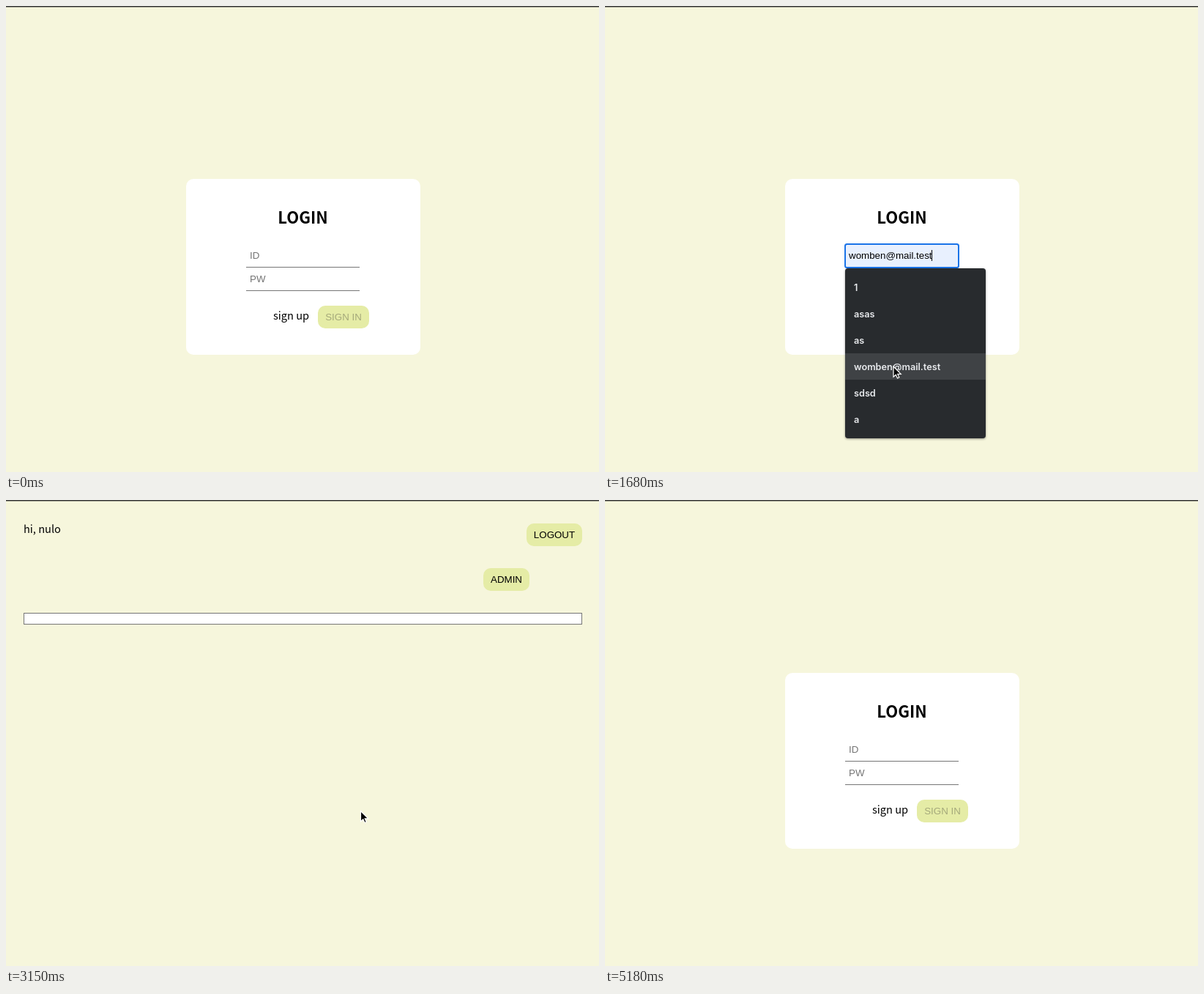
Recreate the animation shown at these times as an HTML page. Size 810 by 636 pixels, loop 5.39 s.

```html
<!DOCTYPE html>
<html lang="en">
<head>
<meta charset="utf-8">
<title>Login demo</title>
<style>
  html, body { margin: 0; width: 100%; height: 100%; overflow: hidden; background: #f6f6dc; }
  svg { display: block; width: 810px; height: 636px; }
  text { font: 13.33px "Liberation Sans", Arial, sans-serif; }
  .page { font: 14.6px "Noto Sans CJK KR", "Noto Sans CJK JP", "Noto Sans CJK SC", sans-serif; }
  .title { font-size: 22px; font-weight: 700; }
  .mid { text-anchor: middle; }
  .button { fill: #e5eca6; }
  .line { stroke: #767676; }
  #popup { filter: drop-shadow(0 1px 1.5px rgba(0, 0, 0, .4)); }
  #popup text { font: 600 12.7px Inter, sans-serif; fill: #e8eaed; }
</style>
</head>
<body>
<svg viewBox="0 0 810 636">
  <rect width="810" height="636" fill="#f6f6dc"/>
  <rect width="810" height="1.5" fill="#333"/>

  <g id="login">
    <rect x="246" y="236" width="320" height="240" rx="10" fill="#fff"/>
    <text class="page title mid" x="405.5" y="297">LOGIN</text>
    <rect id="autofill" x="328" y="325" width="155" height="31" fill="#e8f0fe"/>
    <path class="line" d="M328 356.5h155M328 388.5h155"/>
    <text id="idText" x="333" y="345"></text>
    <text id="pwText" x="333" y="377"></text>
    <rect id="focus" x="328" width="155" height="32" rx="2.5" fill="none" stroke="#1a73e8" stroke-width="2"/>
    <rect id="caret" width="1" height="15"/>
    <text class="page" x="365" y="428">sign up</text>
    <rect class="button" x="426" y="409" width="70" height="31" rx="10"/>
    <text id="signIn" class="mid" x="461" y="429">SIGN IN</text>
    <g id="popup">
      <rect id="panel" x="328" y="358" width="192" rx="4" fill="#282b2e"/>
      <rect id="highlight" x="328" width="192" height="36" fill="#3f4245"/>
      <g id="items"></g>
    </g>
  </g>

  <g id="home">
    <text class="page" x="24" y="45">hi, nulo</text>
    <rect class="button" x="711" y="32" width="76" height="31" rx="10"/>
    <text id="logout" class="mid" x="749" y="52">LOGOUT</text>
    <rect class="button" x="652" y="93" width="63" height="31" rx="10"/>
    <text class="mid" x="683.5" y="113">ADMIN</text>
    <rect class="line" x="24.5" y="154.5" width="762" height="15" fill="#fff"/>
  </g>

  <g id="cursor">
    <path id="arrow" d="M0 0V14.2L3.3 11.2L5.5 16L7.8 15L5.7 10.3H10.2Z" stroke="#fff" stroke-width="1.2"/>
    <g id="beam" fill="none">
      <path d="M-3-8Q0-8 0-6Q0-8 3-8M0-6V6M-3 8Q0 8 0 6Q0 8 3 8M-1.5 2h3" stroke="#fff" stroke-width="2.4"/>
      <path d="M-3-8Q0-8 0-6Q0-8 3-8M0-6V6M-3 8Q0 8 0 6Q0 8 3 8M-1.5 2h3" stroke="#000" stroke-width="1.1"/>
    </g>
    <g id="hand" fill="#fff" stroke="#000" stroke-width="1.1" stroke-linejoin="round">
      <path d="M-1.8 1.5C-2.3-.3 .3-1.1 1 .9L2.6 6C3 4.7 4.9 4.8 5.3 6.2C5.9 5.2 7.5 5.4 7.9 6.8C8.9 6 10.3 6.8 10.4 8.3C10.6 11 10.3 12 9.3 16.3H2.3C1.3 14-.8 12-3 10C-4.3 8.6-2.9 7.2-1.3 8.3L.3 9.6Z"/>
      <path d="M3.4 10.5v3.3M5.6 10.4v3.4M7.8 10.4v3.3"/>
    </g>
  </g>
</svg>
<script>
const LOOP = 5390, TICK = 70;
const EMAIL = 'womben@mail.test';
const SUGGESTIONS = ['1', 'asas', 'as', EMAIL, 'sdsd', 'a'];

// Moments in ms when the interface changes
const AT = { enter: 70, open: 1190, pick: 1750, close: 2170, password: 2450, typed: 2520,
             move: 2590, home: 3150, logout: 4270, leave: 5180 };

// Pointer hotspot: [ms, x, y]
const PATH = [
  [70, 428, 612], [210, 415, 480], [350, 399, 350], [420, 392, 286], [560, 390.5, 335],
  [1400, 390.5, 335], [1470, 391, 370], [1680, 394, 492], [1750, 394, 492], [1890, 390.5, 372],
  [2520, 390.5, 372], [2870, 491, 425], [2940, 484.5, 424.5],
  [3360, 484.5, 424.5], [3570, 55, 51], [3850, 744.5, 48.5],
  [4410, 745, 48], [4480, 680, 200], [4620, 474, 529],
  [4760, 474, 529], [4830, 468, 545], [5110, 420, 625], [5180, 415, 640]
];

const $ = id => document.getElementById(id);
const show = (id, on) => { $(id).style.display = on ? '' : 'none'; };
const set = (id, attrs) => { for (const k in attrs) $(id).setAttribute(k, attrs[k]); };
const within = ([x, y], left, top, right, bottom) => x >= left && x < right && y >= top && y < bottom;

function pointerAt(t) {
  const i = PATH.findIndex(p => p[0] > t);
  if (i === 0) return PATH[0].slice(1);
  if (i < 0) return PATH[PATH.length - 1].slice(1);
  const [t0, x0, y0] = PATH[i - 1], [t1, x1, y1] = PATH[i];
  const k = (t - t0) / (t1 - t0);
  return [x0 + (x1 - x0) * k, y0 + (y1 - y0) * k];
}

function fillField(id, value, placeholder) {
  $(id).textContent = value || placeholder;
  set(id, { fill: value ? '#000' : '#757575' });
}

function drawLogin(t, pointer) {
  const active = t < AT.home;
  const open = t >= AT.open && t < AT.close;
  const picked = active && t >= AT.pick;
  const list = picked ? [EMAIL] : SUGGESTIONS;
  const bottom = 374 + 36 * list.length;
  const overPopup = open && within(pointer, 328, 358, 520, bottom);
  const row = overPopup ? Math.floor((pointer[1] - 366) / 36) : -1;
  const id = picked ? EMAIL : list[row] || '';
  const password = active && t >= AT.typed ? '•' : '';
  const focused = active && t >= AT.open;
  const onPassword = t >= AT.password;
  const overButton = within(pointer, 426, 409, 496, 440);

  fillField('idText', id, 'ID');
  fillField('pwText', password, 'PW');
  show('autofill', id);
  show('focus', focused);
  show('caret', focused);
  if (focused) {
    const field = onPassword ? 'pwText' : 'idText';
    const typedWidth = (onPassword ? password : id) ? $(field).getComputedTextLength() : 0;
    set('focus', { y: onPassword ? 357 : 325 });
    set('caret', { x: 333 + Math.round(typedWidth - .5), y: onPassword ? 365 : 333 });
  }
  set('signIn', { fill: !password ? '#a5a97b' : overButton ? '#fff' : '#000' });

  show('popup', open);
  if (open) {
    set('panel', { height: bottom - 358 });
    show('highlight', list[row]);
    set('highlight', { y: 366 + 36 * row });
    $('items').innerHTML = list.map((s, i) => `<text x="340" y="${388.5 + 36 * i}">${s}</text>`).join('');
  }

  if (overPopup) return 'arrow';
  if (password && overButton) return 'hand';
  const overText = within(pointer, 371, 278, 440, 300) || within(pointer, 328, 325, 483, 389);
  return overText ? 'beam' : 'arrow';
}

function drawHome(pointer) {
  const overLogout = within(pointer, 711, 32, 787, 63);
  set('logout', { fill: overLogout ? '#fff' : '#000' });
  return overLogout ? 'hand' : within(pointer, 24, 32, 73, 54) ? 'beam' : 'arrow';
}

function render(now) {
  const t = Math.floor(now % LOOP / TICK) * TICK;
  const pointer = pointerAt(t);
  const home = t >= AT.home && t < AT.logout;
  show('home', home);
  show('login', !home);
  const shape = home ? drawHome(pointer) : drawLogin(t, pointer);

  const typing = t >= AT.typed && t < AT.move;
  show('cursor', t >= AT.enter && t < AT.leave && !typing);
  for (const kind of ['arrow', 'beam', 'hand']) show(kind, kind === shape);
  set('cursor', { transform: `translate(${pointer})` });
}

let start;
function loop(now) {
  start ??= now;
  render(now - start);
  requestAnimationFrame(loop);
}
requestAnimationFrame(loop);
</script>
</body>
</html>
```
